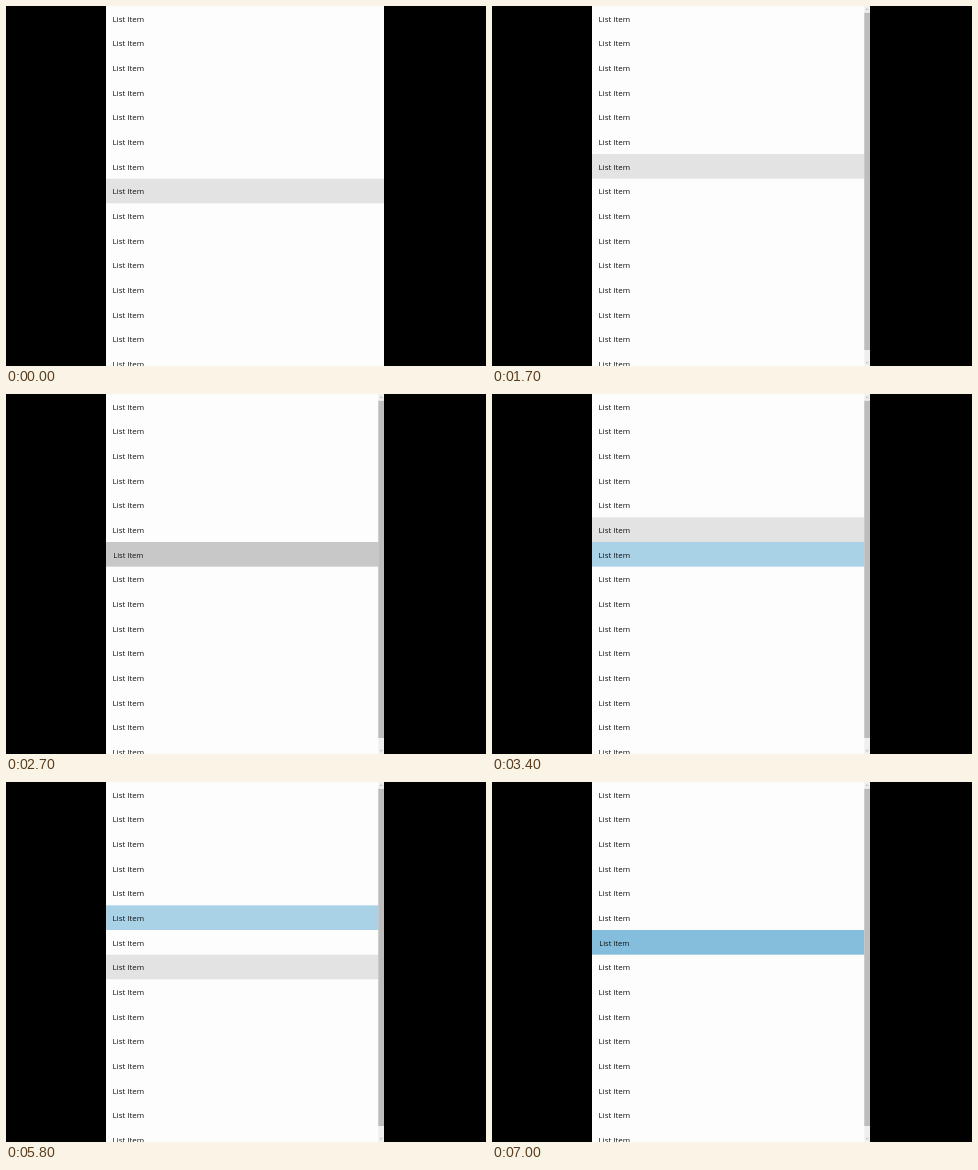
These frames come from a looping animation (480x360 px, 7.1 s). An HTML page:

```html
<!DOCTYPE html>
<html lang="en">
<head>
<meta charset="utf-8">
<title>List selection</title>
<style>
  html, body { margin: 0; width: 100%; height: 100%; overflow: hidden; background: #000; }
  svg { display: block; width: 480px; height: 360px; }
  text { font: 7.95px "Open Sans", "Noto Sans", sans-serif; fill: #111; }
</style>
</head>
<body>
<svg viewBox="0 0 480 360">
  <rect x="100" width="278" height="360" fill="#fdfdfd"/>
  <g id="list"></g>
  <g id="bar">
    <rect x="372.3" width="5.7" height="360" fill="#efefef"/>
    <rect x="372.3" y="6.8" width="5.7" height="337.2" fill="#bdbdbd"/>
    <path d="M373.8 4.2l1.4-1.5 1.4 1.5M373.8 355.8l1.4 1.5 1.4-1.5" fill="none" stroke="#999" stroke-width=".6"/>
  </g>
</svg>
<script>
const LOOP = 7100, PITCH = 74 / 3, ROWS = 15;
const COLORS = {
  rest: 'none', hover: '#e3e3e3', pressed: '#c8c8c8',
  selRest: '#aad2e7', selHover: '#84bedc', selPressed: '#62acd3'
};

// Pointer path: [time, row]
const pointer = [
  [0, 7], [1000, 6], [1100, 4], [1200, 3], [1300, 2],
  [1600, 4], [1700, 6], [1800, 8], [1900, 10], [2000, 9], [2100, 7], [2200, 6],
  [3400, 5], [5200, 6], [5800, 7], [5900, 6]
];
const clicks = [
  { row: 6, down: 2700, up: 2800, rest: 3200 },
  { row: 5, down: 3800, up: 4000, rest: 4400 },
  { row: 6, down: 6100, up: 6200, rest: 6500 },
  { row: 6, down: 6900, up: 7000, rest: 7400 }
];

const list = document.getElementById('list');
const bar = document.getElementById('bar');
const clamp = v => Math.max(0, Math.min(1, v));

function add(tag, attrs) {
  const el = document.createElementNS('http://www.w3.org/2000/svg', tag);
  for (const key in attrs) el.setAttribute(key, attrs[key]);
  return list.appendChild(el);
}

const rows = Array.from({ length: ROWS }, (_, i) => {
  const y = i * PITCH;
  const back = add('rect', { x: 100, y, width: 278, height: PITCH });
  const label = add('text', { x: 106.5, y: y + 15.8 });
  label.textContent = 'List Item';
  return { back, label, mid: y + 13 };
});

function draw(t) {
  const hover = pointer.findLast(p => p[0] <= t)[1];
  const click = clicks.findLast(c => c.down <= t);
  const selected = clicks.findLast(c => c.up <= t)?.row;

  rows.forEach(({ back, label, mid }, i) => {
    const active = click?.row === i;
    const pose = active && t < click.up ? 'Pressed' : i === hover ? 'Hover' : 'Rest';
    back.setAttribute('fill', COLORS[i === selected ? 'sel' + pose : pose.toLowerCase()]);
    const scale = active ? 1 - 0.045 * clamp((click.rest - t) / 300) : 1;
    label.setAttribute('transform',
      `translate(122.3 ${mid}) scale(${scale}) translate(-122.3 ${-mid})`);
  });

  const fade = clamp((t - 900) / 400);
  bar.setAttribute('opacity', t < 1000 ? 0 : 0.33 + 0.67 * Math.sqrt(clamp((fade - 0.2) / 0.8)));
}

const start = performance.now();
function tick() {
  const t = (performance.now() - start) % LOOP;
  draw(Math.floor(t / 100) * 100);
  requestAnimationFrame(tick);
}
tick();
</script>
</body>
</html>
```
